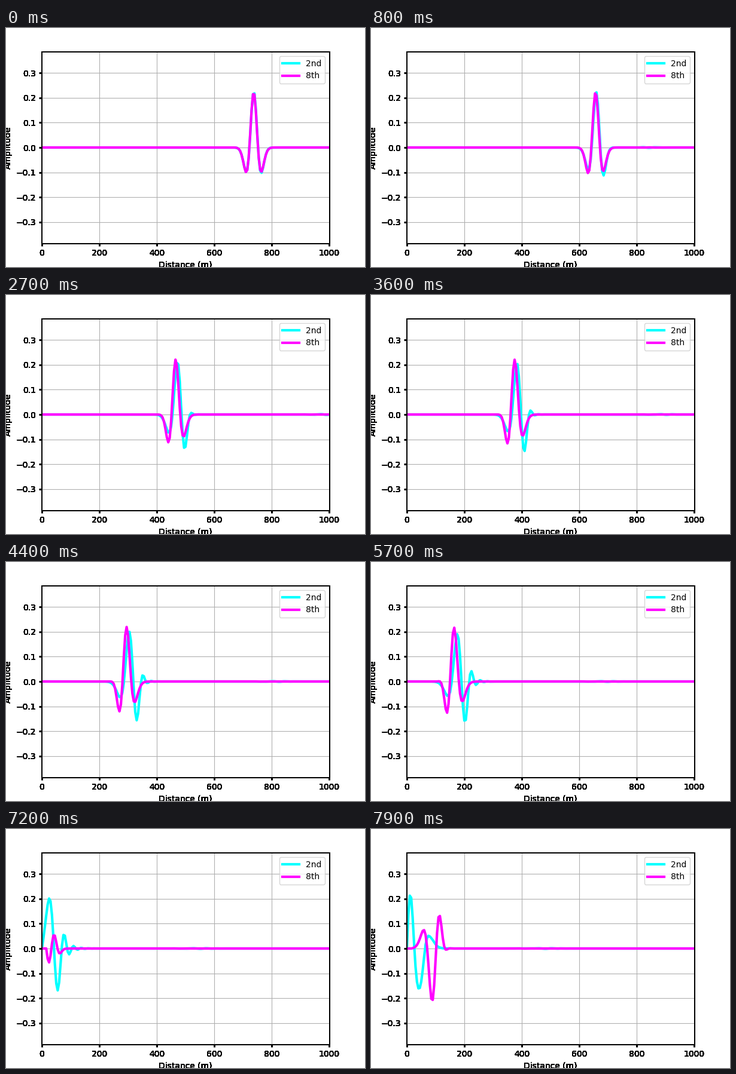
Animation of 600 by 400 pixels, one loop 8 s. Source, as a matplotlib script:

```python
import numpy as np
import matplotlib.pyplot as plt
from matplotlib.animation import FuncAnimation
from matplotlib.patches import Rectangle

FRAMES, INTERVAL = 80, 100
DX, COURANT = 5.0, 0.5
LEAD_STEPS, STEPS_PER_FRAME = 5, 4
X0, SIGMA = 750.0, 15.0

# Second-derivative stencils: centre weight followed by one side
STENCILS = {
    "2nd": (-2, 1),
    "8th": (-205 / 72, 8 / 5, -1 / 5, 8 / 315, -1 / 560),
}
COLORS = {"2nd": "cyan", "8th": "magenta"}

x = np.arange(0, 1000 + DX, DX)


def ricker(center):
    u2 = ((x - center) / SIGMA) ** 2
    amp = 2 / (np.sqrt(3 * SIGMA) * np.pi ** 0.25)
    return amp * (1 - u2) * np.exp(-u2 / 2)


def simulate(weights):
    """Leapfrog a left-going wavelet between fixed ends; return snapshots."""
    half = len(weights) - 1
    kernel = np.array(weights[:0:-1] + weights)
    inner = slice(half, len(x) - half)
    old, now = ricker(X0 + COURANT * DX), ricker(X0)
    shots = []
    for step in range(1, LEAD_STEPS + STEPS_PER_FRAME * (FRAMES - 1) + 1):
        new = np.zeros_like(now)
        new[inner] = (2 * now[inner] - old[inner]
                      + COURANT ** 2 * np.convolve(now, kernel, "valid"))
        old, now = now, new
        if step >= LEAD_STEPS and (step - LEAD_STEPS) % STEPS_PER_FRAME == 0:
            shots.append(now)
    return shots


def overdraw(artist, times=15):
    """Paint an artist repeatedly so its soft edges turn solid."""
    draw = artist.draw

    def repeat(renderer):
        for _ in range(times):
            draw(renderer)

    artist.draw = repeat


waves = {name: simulate(w) for name, w in STENCILS.items()}

fig = plt.figure(figsize=(6, 4), dpi=100)
ax = fig.add_axes([0.1, 0.1, 0.8, 0.8])
ax.set(xlim=(0, 1000), ylim=(-0.385, 0.385),
       xlabel="Distance (m)", ylabel="Amplitude")
ax.set_xticks(np.arange(0, 1001, 200))
ax.set_yticks(np.arange(-3, 4) / 10)
ax.tick_params(width=2.16)
ax.grid(True)

lines = {name: ax.plot(x, waves[name][0], color=COLORS[name], lw=3, label=name)[0]
         for name in STENCILS}
ax.legend(loc="upper right")

# Solid two-pixel frame around the plot, in pixel coordinates
ax.spines[:].set_visible(False)
ax.add_patch(Rectangle((60, 39), 481, 321, transform=None, fill=False,
                       ec="black", lw=1.44, zorder=2.5, clip_on=False))

for axis in (ax.xaxis, ax.yaxis):
    overdraw(axis.label)
    for tick in axis.get_major_ticks():
        overdraw(tick.label1)


def update(i):
    for name, line in lines.items():
        line.set_ydata(waves[name][i])
    return list(lines.values())


anim = FuncAnimation(fig, update, frames=FRAMES, interval=INTERVAL,
                     repeat=True, repeat_delay=0, blit=False)
plt.show()
```
